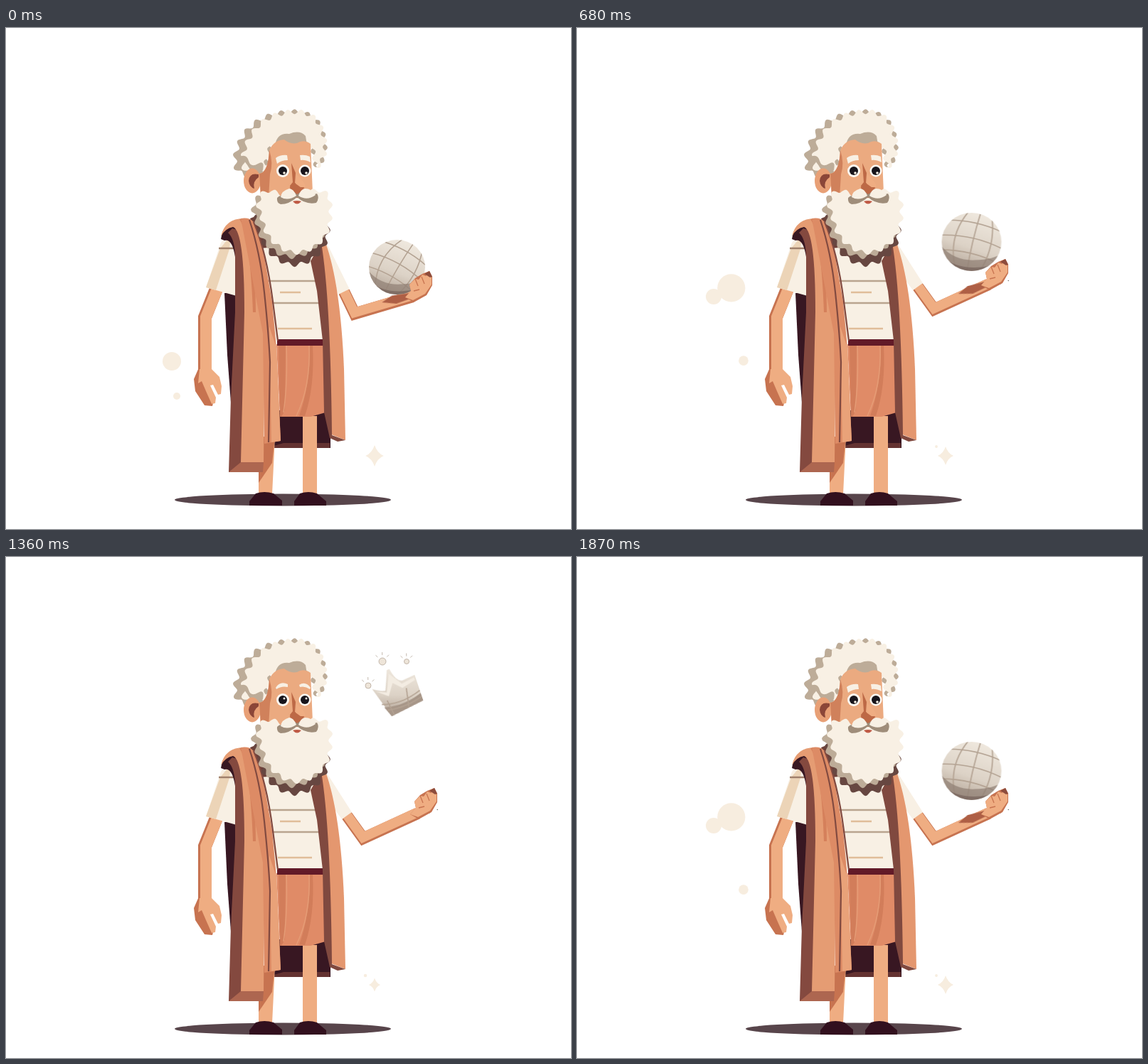
An HTML page for the animation above (2.04 s loop, 794 px wide and 705 px high).

```html
<!DOCTYPE html>
<html lang="en">
<head>
<meta charset="utf-8">
<title>Sage and sphere</title>
<style>
html,body{margin:0;width:100%;height:100%;overflow:hidden;background:#fff}
svg{display:block;width:100vw;height:100vh}
.line{fill:none;stroke:#b3a292;stroke-width:1.6}
.cream{fill:#f8f0e4}
.skin{fill:#efad82}
.shade{fill:#c77350}
.deep{fill:#381722}
.hair{fill:#bdac98}
.limb path{fill:none}
</style>
</head>
<body>
<svg viewBox="0 0 794 705">
<defs>
  <linearGradient id="stone" x1=".7" y1="0" x2=".35" y2="1">
    <stop offset="0" stop-color="#f0e9df"/><stop offset=".6" stop-color="#dcd2c6"/><stop offset="1" stop-color="#b3a496"/>
  </linearGradient>
  <clipPath id="disc"><circle r="40"/></clipPath>
</defs>

<ellipse cx="389" cy="664" rx="152" ry="8.5" fill="#58454b"/>
<g id="bubbles" fill="#f7eddf"></g>
<g id="stars" fill="#f7eddf"></g>

<!-- legs and back of the robe -->
<path class="deep" d="M376 538H456V591H376Z"/>
<path fill="#643332" d="M376 588 390 584H455V591H376Z"/>
<path class="skin" d="M358 575H378L374 656H355V620ZM417 546H437V656H417Z"/>
<path class="shade" d="M355 640V622L362 575H378L374 612Z"/>
<path fill="#32101e" d="M342 672V666L351 655Q363 651 376 655L388 665V672ZM405 672V666L413 655Q425 651 437 655L450 666V672Z"/>

<!-- left arm -->
<g id="restArm"></g>
<path class="shade" d="M271 478 264 494 266 511 279 531 290 532 293 520 280 500Z"/>
<path class="skin" d="M272 480H289L300 491 303 504 302 515 298 516 291 502 287 503 295 520 294 528 289 529 281 511 275 497 270 500Z"/>
<path class="deep" d="M307 373H323V450L316 527 311 460Z"/>
<path class="cream" d="M302 302Q312 290 324 290V377L281 365Z"/>
<path fill="#ecd4b7" d="M301 310 316 292 314 311 295 369 281 365Z"/>
<path d="M299 310H323" fill="none" stroke="#a0806c" stroke-width="2.5"/>

<!-- tunic -->
<path class="cream" d="M350 300H448V440H380Z"/>
<g fill="none" stroke-width="2.3">
  <path stroke="#b9a48f" d="M367 356H437M373 387H440"/>
  <path stroke="#e0bd99" d="M385 372H414M382 423H430"/>
</g>
<path fill="#e08b67" d="M380 445H446L449 541 428 547H385Z"/>
<path fill="#d27d5a" d="M393 447 392 538 387 547H385L383 447ZM427 447Q428 500 412 546H420Q434 505 431 447Z"/>
<path fill="none" stroke="#e59c76" stroke-width="1.5" d="M394 447Q396 500 390 541M426 447Q428 505 408 546"/>
<path fill="#621a28" d="M381 438H446V447H381Z"/>

<g id="arms"></g>
<g id="props"></g>
<g id="hands"></g>

<!-- robe -->
<path fill="#e4976f" d="M443 297 449 302Q470 360 475 480L477 580 457 572 436 330Z"/>
<path fill="#80493f" d="M428 328 443 302Q456 380 458 573L477 580 466 582 455 577 447 541 445 440 437 370Z"/>
<path fill="#6c4039" d="M343 268 358 262 378 308 358 310Z"/>
<path class="deep" d="M302 297Q305 276 325 274L332 300 322 322Q318 296 307 299Z"/>
<path fill="#84493f" d="M318 282 345 290 361 611V625H313L316 520 322 400V320Q321 296 312 288Z"/>
<path fill="#e59c73" d="M302 293Q308 268 334 268 346 275 352 310L364 400 362 611H330L335 400Q335 285 319 280 308 282 302 293Z"/>
<path fill="#d5805b" d="M328 269Q343 290 347 400L351 400Q350 300 336 268Z"/>
<path fill="#dd8b65" d="M330 268Q342 266 348 273L361 310 374 385 380 450 386 581 363 585 361 430Z"/>
<path fill="#e9a279" d="M370 420 380 450 386 581 373 583Z"/>
<path fill="none" stroke="#814a40" stroke-width="2.2" d="M342 270Q357 315 363 372T371 470L369 583M348 273Q366 315 375 385L382 440"/>
<path fill="#ad6650" d="M313 625 330 611H362L361 625Z"/>

<!-- head -->
<g id="hair"></g>
<path class="hair" d="M378 165Q381 147 398 149 413 143 421 152L423 165Z"/>
<ellipse cx="346" cy="215" rx="12" ry="17.5" fill="#e8a076"/>
<path fill="#8b4638" d="M355 206Q342 203 341 215 342 224 349 226 346 216 355 210Z"/>
<path fill="#ebaa80" d="M370 172Q376 158 391 157 399 164 409 162 418 156 428 163L431 232 410 246 358 238 356 205Q369 203 370 172Z"/>
<path fill="#d0815b" d="M370 172Q376 190 371 206L369 238 358 236 356 205Q368 204 370 172Z"/>
<path fill="#bd6946" d="M401 190 407 204 406 218 419 223Q421 229 413 230L400 229 399 222 403 217Z"/>
<path class="skin" d="M408 205 419 218Q422 224 418 227L407 219Z"/>
<g fill="#fffaf2"><circle cx="389" cy="201" r="9"/><circle cx="420" cy="201" r="8.5"/></g>
<g fill="#17141b"><circle cx="389" cy="201" r="6"/><circle cx="420" cy="201" r="6"/></g>
<g id="faces" class="cream"></g>
<g id="beard"></g>
<path fill="#bd6946" d="M399 224H419L414 239H404Z"/>
<path fill="#9f8d7a" d="M409 238Q398 248 386 248 380 246 381 239 385 234 391 237 399 235 404 230L409 234 415 230Q427 237 437 233 441 239 436 246 421 249 409 238Z"/>
<path class="cream" d="M408 236Q396 244 386 238 387 229 398 226 404 226 408 236ZM411 236Q423 244 435 235 430 226 420 226 414 227 411 236Z"/>
<path fill="#bf5a45" d="M403 244Q409 242 415 244 409 251 403 244Z"/>
</svg>

<script>
const STEP = 170, COUNT = 12, NS = 'http://www.w3.org/2000/svg';
const $ = id => document.getElementById(id);
const path = (d, attrs = '') => `<path d="${d}" ${attrs}/>`;
const dot = (x, y, rx, ry = rx) => `<ellipse cx="${x}" cy="${y}" rx="${rx}" ry="${ry}"/>`;
const range = (a, b) => Array.from({ length: b - a + 1 }, (_, i) => a + i);

// ripples a closed outline into curls
function curls(outline, bumps, amp) {
  const base = document.createElementNS(NS, 'path');
  base.setAttribute('d', outline);
  const len = base.getTotalLength(), n = bumps * 10, out = [];
  for (let i = 0; i < n; i++) {
    const s = len * i / n;
    const p = base.getPointAtLength(s), q = base.getPointAtLength((s + 1) % len);
    const size = Math.hypot(q.x - p.x, q.y - p.y) || 1;
    const k = amp * Math.cos(2 * Math.PI * i / 10) / size;
    out.push(`${(p.x + (q.y - p.y) * k).toFixed(1)} ${(p.y - (q.x - p.x) * k).toFixed(1)}`);
  }
  return 'M' + out.join(' ') + 'Z';
}

const scalp = x => `M${338 + x} 207Q${314 + x} 203 ${325 + x} 168 ${338 + x} 132 ${375 + x / 2} 122 435 106 446 150 454 180 436 197L430 165 400 158 372 165 362 202Z`;
$('hair').innerHTML = path(curls(scalp(0), 22, 3.5), 'class="hair"') +
  path(curls(scalp(11), 21, 3.5), 'class="cream"') +
  path('M329 181Q338 177 341 187T354 191 361 200L355 204Q344 202 341 196T329 181Z', 'class="hair"');

const beard = curls('M354 250Q356 228 372 229L403 238 432 229Q456 226 456 250 458 285 443 300 425 318 402 316 375 308 364 284Z', 17, 3);
$('beard').innerHTML = path(beard, 'fill="#674741" transform="translate(-3 17)"') +
  path(beard, 'class="hair" transform="translate(-7 6)"') + path(beard, 'class="cream"');

// adds a group seen only during the given steps
function pose(layer, steps, markup) {
  const g = document.createElementNS(NS, 'g');
  g.innerHTML = markup;
  $(layer).append(g);
  const frames = range(0, COUNT).map(i => ({
    opacity: steps.includes(i % COUNT) ? 1 : 0, offset: i / COUNT, easing: 'step-end'
  }));
  g.animate(frames, { duration: STEP * COUNT, iterations: Infinity });
}

// a bent limb: shaded stroke with a lighter one on top
function limb(joints, width, dx, dy) {
  const d = 'M' + joints.join(' ');
  return '<g class="limb">' + path(d, `stroke="#c77350" stroke-width="${width}"`) +
    path(d, `stroke="#efad82" stroke-width="${width - 3}" transform="translate(${dx} ${dy})"`) + '</g>';
}
$('restArm').innerHTML = limb([[296, 366], [279.5, 407], [279.5, 484]], 19, 1.5, 0);

const fist = path('M-10 1-2-8-4-17 4-26 14-32 24-36 28-28V-16L20-2 2 8Z', 'class="shade"') +
  path('M-10 1-2-8-4-17 4-25 9-24 14-31 19-29 24-34 27-27V-17L18-4 1 5Z', 'class="skin"') +
  path('M4-25 8-15M13-28 17-18M2-8 10-10', 'fill="none" stroke="#c77350" stroke-width="1.3"') +
  path('M17-32 24-36 28-28 25-27Z', 'fill="#8d4c3c"');

function arm(steps, shoulder, elbow, wrist) {
  const [x, y] = shoulder, dx = elbow[0] - x, dy = elbow[1] - y, k = 8.5 / Math.hypot(dx, dy);
  const cuff = [x + dy * k, y - dx * k, x - dy * k, y + dx * k].join(' ');
  pose('arms', steps, limb([shoulder, elbow, wrist], 16.5, -.3, -1.5) +
    path(`M446 299 454 309 ${cuff} 450 340Z`, 'class="cream"'));
  pose('hands', steps, `<g transform="translate(${wrist})">${fist}</g>`);
  const under = [-46, 4, -4, 46].map((s, i) => [wrist[0] + (i < 2 ? s : -s - (i > 2 ? 0 : 4)), wrist[1]]);
}
const MID = [0, 1, 3], LOW = [2], HIGH = range(4, 11);
arm(MID, [475, 371], [490, 402], [571, 378]);
arm(LOW, [470, 374], [480, 412], [571, 397]);
arm(HIGH, [479, 364], [502, 396], [578, 361]);

// shadow cast on the forearm
const cast = (x, y, turn) => path('M-20 2-5-6 22-7 20 1 0 6Z', `fill="#ae5f45" transform="translate(${x} ${y}) rotate(${turn})"`);
pose('arms', MID, cast(548, 382, -6));
pose('arms', LOW, cast(548, 398, 0));
pose('arms', [4, 5, 10, 11], cast(555, 368, -12));

let seed = 5;
const rand = () => (seed = seed * 16807 % 2147483647) / 2147483647;
pose('arms', HIGH, '<g fill="#78706c">' + range(1, 6).map(() => dot(587 + rand() * 21, 322 + rand() * 56, .8)).join('') + '</g>');

// sphere
const grid = [-1, 0, 1].map(k =>
  `M-42 ${21 * k}Q0 ${21 * k - 11} 42 ${21 * k}M${15 * k + 3}-42Q${34 * k} 0 ${15 * k + 3} 42`).join('');
function ball(steps, x, y, r, turn) {
  pose('props', steps, `<g transform="translate(${x} ${y}) scale(${r / 40} ${r / 41})"><circle r="40" fill="url(#stone)"/>
    <g clip-path="url(#disc)">${path(grid, `class="line" transform="rotate(${turn})"`)}
    ${path('M-42 4Q-24 26 4 25T42 14V42H-42Z', 'fill="#8c7b70" opacity=".65"')}
    ${path('M-42 18Q-22 37 8 35T38 26V42H-42Z', 'fill="#66534c" opacity=".5"')}</g></g>`);
}
ball(MID, 549.5, 336.5, 39.5, 30);
ball(LOW, 551, 352, 42, 35);
ball([4, 11], 554.5, 301, 42, 13);

// sphere turning into a crown
pose('props', [5, 10], path('M524 237Q528 236 531 242 537 233 553 241 562 237 565 230 571 231 575 246L592 247 588 276 572 299 547 296 522 285 519 260Z', 'fill="url(#stone)"') +
  path('M524 238 531 243 555 242 565 231 575 248 591 249 586 264 570 249 559 260 544 250 532 256Z', 'fill="#eee7dc"') +
  path('M521 276Q548 288 586 278L572 299 547 296 522 287Z', 'fill="#8b7b71"') +
  path('M521 258Q549 275 590 264M525 271Q550 284 586 280M538 262 525 286M561 250Q551 272 550 291', 'class="line"'));

const crown = path('M517 206Q527 213 534 214 540 200 545 187L549 187Q552 206 561 208L580 206V244L531 251Z', 'fill="url(#stone)"') +
  path('M521 211 535 217 546 193 559 212 578 209V213L558 218 547 207 536 223Z', 'fill="#f3ece2"') +
  path('M525 236Q550 243 580 233V244L531 251Z', 'fill="#a79688"') +
  path('M523 231Q549 240 580 229M528 241Q552 246 580 238M532 228 535 250M563 220 558 246', 'class="line"');
for (const i of range(6, 9)) {
  const lift = 31 - 8 * (i - 8) ** 2;
  pose('props', [i], `<g transform="translate(0 ${-lift}) rotate(${-lift * .6} 549 219)">${crown}</g>`);
}

// sparks over the crown tips
function spark(x, y, r) {
  const rays = [-2.4, -1.6, -.8].map(a => {
    const c = Math.cos(a), s = Math.sin(a);
    return `M${x + c * (r + 4)} ${y + s * (r + 4)}l${c * 4} ${s * 4}`;
  });
  return dot(x, y, r) + path(rays.join(''));
}
pose('props', [8], `<g fill="#eee5d9" stroke="#b5a89b" stroke-width=".8">${spark(529, 147, 5) + spark(563, 147, 3.5) + spark(509, 181, 4)}</g>`);

// brows and glints
pose('faces', [...range(0, 5), 10, 11], path('M379 183Q386 178 395 179L396 186Q387 186 381 191ZM413 179Q421 178 427 181L428 189Q420 185 414 186Z'));
pose('faces', range(6, 9), path('M379 184Q385 174 396 179L396 183Q387 181 380 186ZM412 180Q421 174 428 184L427 186Q420 181 413 183Z'));
pose('faces', [0, 1, 4, 10, 11], dot(391, 204, 1.8) + dot(422, 204, 1.8));
pose('faces', [2, 3, ...range(5, 9)], dot(391, 199, 1.5) + dot(422, 199, 1.5));

// bubbles rise, swell and shrink, then return
for (const i of [...range(0, 6), 10, 11]) {
  const u = Math.max(0, (i > 6 ? 15 - i : i) - 1) / 5, wave = Math.sin(Math.PI * u);
  let dots = dot(233 - 17 * wave, 335 + 134 * (1 - u) ** 1.6, 13 + 7 * wave - 5.5 * u ** 9) +
    dot(240 - 10 * u, 518 - 92 * u ** 1.2, 5 + 3 * u);
  if (u > .5 && u < .9) dots += dot(228 - 60 * u, 378, 11);
  pose('bubbles', [i], dots);
}

// twinkle
for (const i of range(0, COUNT - 1)) {
  const r = 12 + 3 * Math.cos(2 * Math.PI * i / 5), k = r * .25, w = r * .85;
  pose('stars', [i], path(`M0 ${-r}Q${k} ${-k} ${w} 0 ${k} ${k} 0 ${r} ${-k} ${k} ${-w} 0 ${-k} ${-k} 0 ${-r}Z`, 'transform="translate(518 602)"') +
    (i ? dot(505, 589, 3.2 - r * .1) : ''));
}
</script>
</body>
</html>
```
